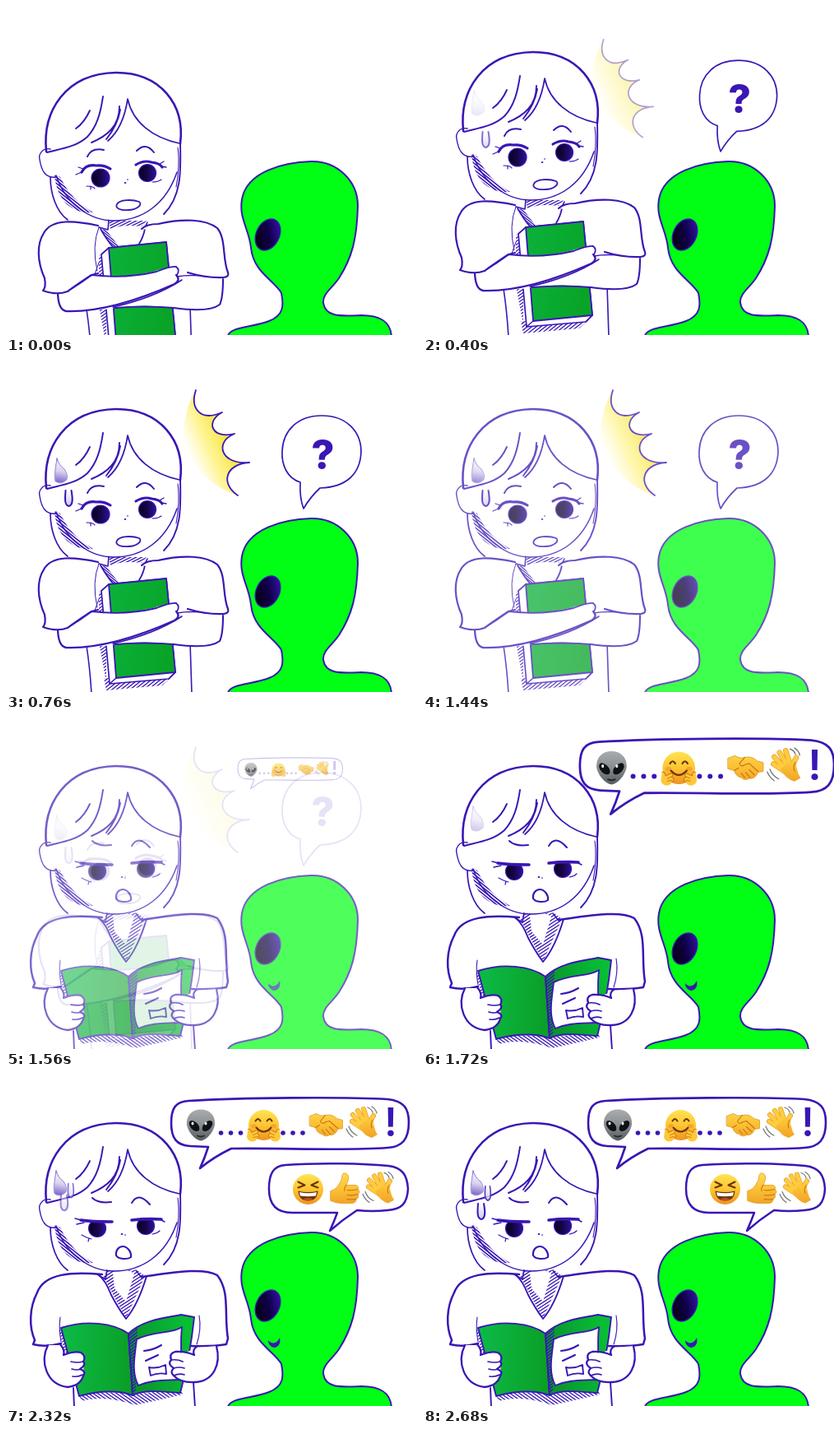
An HTML page with a canvas that plays this animation: 500x400 px, repeating every 3 s.

```html
<!DOCTYPE html>
<html lang="en">
<head>
<meta charset="utf-8">
<title>Alien greeting</title>
<style>
html, body { margin: 0; width: 100%; height: 100%; overflow: hidden; background: #fff; }
canvas { position: absolute; left: 0; top: 0; width: 500px; height: 400px; }
</style>
</head>
<body>
<canvas id="talk" width="500" height="400"></canvas>
<canvas id="meet" width="500" height="400"></canvas>
<script>
const LOOP = 3000, STEP = 40;
const INK = '#3a16b4', GREEN = '#00ff14';
const meet = document.getElementById('meet'), talk = document.getElementById('talk');
let c;

// Eased interpolation through [time, value] pairs
function key(t, ...pts) {
  if (t <= pts[0][0]) return pts[0][1];
  for (let i = 1; i < pts.length; i++) {
    const [a, u] = pts[i - 1], [b, v] = pts[i];
    if (t <= b) {
      const x = (t - a) / (b - a);
      return u + (v - u) * x * x * (3 - 2 * x);
    }
  }
  return pts[pts.length - 1][1];
}

function line(d, w = 2.2, color = INK) {
  c.strokeStyle = color;
  c.lineWidth = w;
  c.stroke(new Path2D(d));
}
function fill(d, color = '#fff') {
  c.fillStyle = color;
  c.fill(new Path2D(d));
}
function shape(d, color, w = 2) {
  fill(d, color);
  line(d, w);
}
function oval(x, y, rx, ry, color, turn = 0) {
  c.beginPath();
  c.ellipse(x, y, rx, ry, turn, 0, 7);
  c.fillStyle = color;
  c.fill();
}
function blend(x0, y0, x1, y1, ...colors) {
  const g = c.createLinearGradient(x0, y0, x1, y1);
  colors.forEach((k, i) => g.addColorStop(i / (colors.length - 1), k));
  return g;
}
function layer(draw) {
  c.save();
  draw();
  c.restore();
}
function at(x, y, draw, alpha = 1) {
  if (alpha <= 0) return;
  layer(() => {
    c.globalAlpha = alpha;
    c.translate(x, y);
    draw();
  });
}
function scaled(x, y, s, draw, alpha = 1) {
  if (s <= 0) return;
  at(x, y, () => {
    c.scale(s, s);
    c.translate(-x, -y);
    draw();
  }, alpha);
}
// Diagonal pen strokes clipped to an area
function hatch(area, x, y, w, h, gap = 3.5, slope = 0.8, weight = 1.3) {
  layer(() => {
    c.clip(new Path2D(area));
    c.beginPath();
    for (let k = y - w; k < y + h + w; k += gap) {
      c.moveTo(x, k);
      c.lineTo(x + w, k + w * slope);
    }
    c.strokeStyle = INK;
    c.lineWidth = weight;
    c.stroke();
  });
}
function glyph(s, x, y, size, weight) {
  c.font = `${weight} ${size}px Inter, sans-serif`;
  c.textAlign = 'center';
  c.textBaseline = 'alphabetic';
  c.fillStyle = INK;
  c.fillText(s, x, y);
}

// ---------- Characters ----------
function alien(smiling) {
  shape('M371 189C402 188 428 212 428 243C427 283 421 306 405 331C396 344 385 350 386 361C389 379 408 377 432 376C456 376 468 384 469 402H270C270 390 300 391 320 383C338 376 338 364 335 349C327 334 301 324 298 294C296 272 283 258 287 235C293 201 338 190 371 189Z', GREEN, 2);
  oval(318.5, 278, 14, 20, blend(304, 279, 335, 272, '#080018', '#10004a', '#3212a0'), 0.45);
  c.strokeStyle = INK;
  c.lineWidth = 1.4;
  c.stroke();
  if (smiling) {
    fill('M319 320C323 325 329 325 333 317C335 325 330 329 326 329C322 328 319 325 319 320Z', INK);
  }
}

function head() {
  fill('M49 152C44 103 72 57 134 56C188 56 218 95 212 142L209 195Q185 236 135 236Q85 232 60 183L42 170Z');
  line('M49 152C44 103 72 57 134 56C188 56 218 95 212 142', 2.6);
  line('M50 153C64 149 85 147 99 134C111 121 115 105 118 85', 1.9);
  line('M102 102C98 111 92 119 85 124M138 97C138 121 123 133 104 141M139 101C137 113 130 127 122 137', 1.9);
  line('M148 88C145 108 138 127 124 139M148 88C154 116 178 135 211 142', 1.7);
  line('M54 149C45 147 39 155 41 162C43 174 47 185 62 183', 1.4);
  line('M54 183C54 203 61 225 75 235', 1.7);
  line('M61 181C72 215 102 236 131 236C167 236 195 215 208 177', 1.5);
  line('M212 142C213 178 213 207 192 228', 1.9);
  line('M209 147C211 160 210 180 207 195', 1.1);
  const shade = 'M59 180L66 183Q79 211 106 226Q88 228 74 216Q61 203 59 180Z';
  hatch(shade, 55, 176, 55, 54, 3.8, 0.8, 1.6);
}

function iris(x, y, r) {
  oval(x, y, r, r, blend(x - r, y, x + r, y, '#08001c', '#160648', '#2c1298'));
  c.strokeStyle = INK;
  c.lineWidth = 1.2;
  c.stroke();
}

function worriedFace() {
  iris(115, 184, 11);
  iris(172, 178, 10.5);
  line('M92 177Q97 167 110 169Q119 168 127 173M158 168Q168 162 177 165Q187 166 190 171', 3.2);
  line('M92 177L85 180M94 173L88 171M189 170L195 171M187 167L192 164', 1.3);
  line('M98 194Q106 194 108 197M178 189Q185 189 189 186M103 194L103 198', 1.2);
  line('M99 158Q104 147 119 150M159 151Q170 140 180 153', 2);
  oval(145, 190, 1.3, 1, INK);
  oval(148, 186, 0.9, 0.8, INK);
  shape('M135 216C138 210 154 210 162 213C167 217 158 223 149 223C140 224 132 221 135 216Z', '#fff', 1.8);
}

function readingFace() {
  iris(111, 184, 10.5);
  iris(170, 181, 10.5);
  fill('M90 165H130V176L90 174ZM154 162H188V173L154 174Z');
  line('M91 174Q104 176 129 176M153 174Q170 172 189 173', 3.6);
  line('M92 174L84 172M95 177L86 179M187 173L193 176', 1.4);
  line('M92 192Q99 196 104 197M101 196L100 200M178 191Q184 190 187 187', 1.2);
  line('M105 147Q112 154 128 152M153 153Q161 139 175 155', 2);
  oval(141, 191, 1.4, 1, INK);
  oval(145, 192, 0.9, 0.8, INK);
  shape('M134 217C133 211 137 206 142 206C148 206 153 213 152 219C148 222 137 222 134 217Z', '#fff', 2.1);
}

function browDrop() {
  const d = 'M-5 -24C-7 -10 -9 -2 -7 4Q0 9 7 2Q9 -4 4 -11Q-3 -16 -5 -24Z';
  fill(d, blend(3, -24, -3, 8, '#ffffff', '#d8d0f0', '#6a52c2'));
  line(d, 1, blend(0, -24, 0, 6, '#7a66c8', '#b8aee2'));
}
function cheekDrop() {
  const d = 'M-4 -9C-5 3 -5 9 0 10C5 9 5 2 3 -9';
  fill(d, blend(0, -9, 0, 10, '#ffffff', '#cfc6ee'));
  line(d, 2);
}

function huggingBody() {
  line('M98 344Q102 370 104 402M224 340Q225 370 226 402', 1.6);
  hatch('M125 236H171L165 243Q142 240 127 246Z', 122, 233, 50, 16, 3.4, -0.5);
  line('M125 235L124 247L113 244M172 238L168 246', 1.6);
  line('M115 246Q123 260 131 269M169 246Q167 256 162 264', 1.8);
  hatch('M115 247L121 246L137 267L131 269Z', 110, 243, 30, 28, 3);

  // Book held against the chest
  hatch('M113 279L122 273V388L113 340Z', 108, 260, 18, 126, 4, -0.7);
  hatch('M119 383L198 385L190 392L122 398Z', 115, 370, 85, 35, 4.4, -0.8);
  shape('M125 269L116 277L126 390L198 384L206 376L195 262Z', '#fff', 1.7);
  shape('M125 269L195 262L206 376L134 383Z', blend(128, 300, 204, 315, '#0bb038', '#08a428'), 1.8);
  line('M126 390L134 383M198 384L206 376', 1.5);

  // Crossed arms and sleeves
  fill('M64 320L104 303Q150 308 196 293Q209 289 210 300L265 304Q266 336 258 341Q225 347 205 342Q165 336 120 344L72 346Q63 340 64 320Z');
  line('M74 322Q90 313 104 302Q145 307 183 298Q200 291 207 292Q212 296 208 302', 1.8);
  line('M63 322Q63 344 73 346Q126 348 205 313Q213 308 207 302', 2.3);
  line('M130 341Q180 330 214 308M208 304Q224 301 248 304', 1.5);
  line('M264 307Q264 330 260 338Q247 348 204 342Q170 339 132 342', 2.1);
  shape('M112 242C84 236 56 233 46 251C37 265 38 286 47 306Q49 317 45 321Q62 327 75 322Q83 316 104 302L112 300', '#fff', 2.2);
  const sleeve = 'M165 246Q171 240 185 240C215 233 243 234 257 245C268 258 263 282 270 299Q272 304 265 305Q244 306 221 299';
  fill(sleeve + 'L212 290L202 262L190 250Z');
  line(sleeve, 2.2);
  line('M113 244Q104 267 111 297M113 287L108 301', 1);
}

function readingBody() {
  hatch('M118 242L126 233L160 235L169 242L146 294Z', 112, 230, 62, 68, 4, -0.65);
  fill('M130 238Q145 231 156 239L146 273L132 257Z');
  line('M123 234L121 246L111 240M158 235L165 244', 1.6);
  line('M113 241Q121 247 128 265Q137 282 146 294Q161 276 171 242', 1.9);
  line('M117 240C81 237 47 238 38 262C28 281 28 304 35 320L33 325Q48 329 67 324', 2.5);
  line('M165 243C202 238 240 231 257 241C273 261 265 289 270 318L268 325Q250 328 225 327', 2.5);
  line('M66 292Q64 305 67 322M235 290Q238 307 232 325', 1.1);
  line('M82 378L83 402M228 371L230 402', 1.9);

  // Open book
  hatch('M64 306L72 311L90 388L73 340Z', 60, 296, 32, 94, 4, -0.7);
  hatch('M89 387Q125 380 154 386L213 379L215 386L157 399Q120 386 92 394Z', 85, 372, 130, 30, 4, 0.7);
  shape('M67 305C97 295 131 299 149 312L154 387C132 379 108 383 89 388Z', blend(70, 345, 154, 350, '#0cb945', '#0a9e26'), 1.9);
  shape('M149 312C167 294 200 292 213 289L229 292Q224 340 212 384C190 383 170 379 154 387Z', blend(150, 345, 226, 330, '#089428', '#08a832', '#08be34'), 1.9);
  hatch('M149 313L160 305L158 383L154 387Z', 145, 298, 18, 92, 3.8, -0.8);
  shape('M159 319C180 308 201 313 214 304C211 328 216 345 210 368C190 369 178 368 161 375C152 358 157 338 159 319Z', '#fff', 1.8);
  line('M168 333Q179 332 189 326M170 345L185 338', 2.1);
  line('M174 353Q184 355 194 350L195 361Q185 359 176 363Z', 1.9);

  // Forearms and fingers
  fill('M51 326H68L74 337Q94 330 95 340L94 363Q86 378 72 377Q43 366 51 326Z');
  line('M51 326C41 346 49 374 75 377Q91 375 94 363Q98 358 90 355Q98 350 94 346Q98 339 91 335Q83 333 70 338Q72 332 66 325', 2.3);
  line('M79 346Q87 348 94 346M80 355Q87 357 91 355M81 364Q88 365 93 362', 1.7);
  fill('M257 327L231 329Q224 335 205 336L200 343L203 363Q212 370 228 371Q257 372 257 327Z');
  line('M256 327C262 350 252 370 230 371Q212 372 204 363Q199 359 204 354Q196 349 201 344Q198 336 206 334Q218 333 229 338Q226 331 233 327', 2.3);
  line('M201 344Q209 343 215 346M204 354Q211 352 217 354M204 363Q211 360 217 362', 1.7);
}

// ---------- Emoji, drawn in a 40 px box ----------
const skin = () => blend(0, -19, 0, 19, '#ffdb52', '#fcc236', '#f0a226');
const CREASE = '#c87512', BROWN = '#6b3308';

function face() {
  oval(0, 0, 18.5, 18.5, blend(0, -18, 0, 18, '#ffe34f', '#fdc534', '#ef9420'));
}
function alienHead() {
  fill('M0 -19C13 -19 18 -9 17 0C15 9 7 18 0 19C-7 18 -15 9 -17 0C-18 -9 -13 -19 0 -19Z', blend(0, -19, 0, 19, '#a9adb0', '#888d91', '#555b60'));
  oval(-8, 1, 4.6, 7.8, '#101114', -0.75);
  oval(8, 1, 4.6, 7.8, '#101114', 0.75);
  oval(-10, -2, 1.5, 2, '#e9edf0');
  oval(6, -2, 1.5, 2, '#e9edf0');
  line('M-4 13Q0 15 4 13', 1.8, '#24272a');
}
function hug() {
  face();
  line('M-10 -5Q-7 -10 -4 -5M4 -5Q7 -10 10 -5', 2, BROWN);
  line('M-9 3Q0 13 9 3', 2.2, BROWN);
  oval(-12, 1, 3.5, 2.5, '#f08a3088');
  oval(12, 1, 3.5, 2.5, '#f08a3088');
  for (const s of [-1, 1]) layer(() => {
    c.scale(s, 1);
    fill('M-19 5Q-16 3 -15 9L-9 6Q-5 7 -8 10L-6 12Q-5 15 -8 16Q-9 20 -15 20Q-22 18 -20 11Z', '#ffc83a');
    line('M-19 5Q-16 3 -15 9L-9 6Q-5 7 -8 10L-6 12Q-5 15 -8 16', 1, CREASE);
    line('M-13 12L-8 10M-13 15L-8 14', 0.9, CREASE);
  });
}
function laugh() {
  face();
  line('M-12 -9L-4 -5L-12 -2M12 -9L4 -5L12 -2', 2.1, BROWN);
  fill('M-12 2Q0 5 12 2Q11 14 0 14Q-11 14 -12 2Z', BROWN);
  fill('M-10.5 3.5Q0 6 10.5 3.5L9.5 8Q0 9.5 -9.5 8Z');
  oval(0, 12, 5.5, 1.6, '#b8502c');
}
function shake() {
  const d = 'M-20 -9L-12 -12Q-7 -8 -1 -10Q7 -12 13 -6L20 -4L20 6L14 7Q11 15 4 14Q-1 17 -5 13Q-11 12 -13 5L-20 3Z';
  fill(d, skin());
  line(d, 0.8, '#e09a28');
  line('M-1 -10L-7 -3Q-6 2 0 -2L4 -3L14 6M4 4L10 10M0 7L5 13M-5 8L-1 13M-13 5L-8 2', 1.1, CREASE);
}
function thumb() {
  const d = 'M-17 3Q-10 1 -7 -5Q-3 -10 -3 -16Q-2 -20 2 -18Q6 -16 4 -9L2 -4H13Q18 -3 16 1Q20 4 16 7Q18 11 14 13Q14 18 8 18H-4Q-10 18 -17 15Z';
  fill(d, skin());
  line(d, 0.8, '#e09a28');
  line('M3 2Q9 3 16 1M3 8Q10 9 16 7M3 13Q9 14 14 13M2 -4Q-1 -1 0 3', 1.1, CREASE);
}
function wave() {
  const fingers = 'M7 2L1 -16M4 3L-6 -14M2 6L-12 -9M2 9L-13 -1M10 4Q9 -3 13 -8';
  line(fingers, 6, '#df9a22');
  line(fingers, 4.8, '#ffcb40');
  fill('M-5 5L5 -4Q13 -3 14 5Q15 11 18 15L11 19Q2 17 -5 5Z', skin());
  line('M12 -3Q9 2 11 7', 1.1, CREASE);
  line('M6 -18Q11 -16 12 -12M11 -19Q16 -16 17 -11M-17 5Q-14 13 -7 16M-20 8Q-17 15 -12 18', 1.3, '#77797c');
}

// ---------- Bubbles and effects ----------
function questionBubble() {
  shape('M358 145C342 140 335 124 336 107C337 82 355 64 384 64C414 64 432 83 432 108C431 135 414 151 382 152Q370 163 362 177Q357 164 358 145Z', '#fff', 1.7);
  glyph('?', 385.5, 129, 49, 800);
}
function dots(x) {
  for (const dx of [0, 12, 24]) oval(x + dx, 68, 2.8, 2.8, INK);
}
function longBubble() {
  shape('M222 29C285 25 410 24 464 27C484 29 490 38 490 55C490 76 482 85 464 86C410 90 337 86 274 87Q253 97 236 111Q242 98 246 85L224 84C207 83 201 74 201 56C201 38 206 30 222 29Z', '#fff', 2.6);
  at(237, 58.5, alienHead);
  dots(261.5);
  at(313.5, 58.5, hug);
  dots(337);
  at(389.5, 56.5, shake);
  at(434, 55, wave);
  glyph('!', 468, 72, 48, 600);
}
function shortBubble() {
  shape('M340 107C380 104 435 105 465 108C482 110 488 119 489 136C488 154 481 161 464 162Q446 164 427 162Q410 173 394 187Q399 176 403 165L348 165C328 165 320 154 320 136C320 118 325 108 340 107Z', '#fff', 2.5);
  at(367.5, 136.5, laugh);
  at(412, 135.5, thumb);
  at(454, 134.5, wave);
}
function burst() {
  const edge = 'M231 33C224 54 235 72 263 60C242 71 250 93 278 86C253 96 261 124 296 121C266 123 261 147 282 161';
  fill(edge + 'Q235 146 215 95Q216 57 231 33Z', blend(220, 108, 266, 88, '#fff58a00', '#fff06cb0', '#f5e542'));
  line(edge, 1.8);
}

function drawMeet(t) {
  alien(false);
  layer(() => {
    c.translate(0, key(t, [160, 25], [360, 0]));
    huggingBody();
    head();
    worriedFace();
    at(67, key(t, [320, 122], [400, 127], [640, 140]), browDrop, key(t, [360, 0], [400, 0.15], [600, 1]));
    at(76.5, key(t, [280, 158], [400, 162], [600, 164]), cheekDrop, key(t, [280, 0], [400, 0.6], [560, 1]));
  });
  scaled(70, 140, key(t, [280, 0.82], [400, 0.93], [600, 1.04], [720, 1.02], [760, 1]), burst,
    key(t, [280, 0], [400, 0.4], [600, 1]));
  scaled(364, 172, key(t, [200, 0], [400, 0.98], [500, 1.04], [680, 1]), questionBubble,
    key(t, [200, 0], [320, 1]));
}

function drawTalk(t) {
  alien(true);
  readingBody();
  head();
  readingFace();
  at(66, key(t, [1640, 120], [1720, 129], [1960, 138]), browDrop, key(t, [1640, 0], [1720, 0.35], [1960, 1]));
  at(79, key(t, [2000, 131], [2520, 141]), () => {
    c.scale(0.8, 0.9);
    cheekDrop();
  }, key(t, [2000, 0], [2080, 0.3], [2520, 0.85]));
  at(71, key(t, [2120, 148], [2680, 163]), cheekDrop, key(t, [2120, 0], [2520, 1]));
  scaled(346, 62, key(t, [1500, 0.3], [1720, 1.07], [1960, 1]), longBubble, key(t, [1500, 0], [1640, 1]));
  scaled(408, 148, key(t, [1960, 0], [2080, 0.96], [2200, 1.06], [2360, 0.99], [2520, 1]), shortBubble,
    key(t, [1960, 0], [2060, 1]));
}

function render(canvas, opacity, draw, t) {
  canvas.style.opacity = opacity;
  if (opacity <= 0) return;
  c = canvas.getContext('2d');
  c.clearRect(0, 0, 500, 400);
  c.lineCap = c.lineJoin = 'round';
  draw(t);
}

const start = performance.now();
function tick() {
  const now = (performance.now() - start) % LOOP;
  const t = Math.floor(now / STEP) * STEP;
  render(meet, key(t, [1400, 1], [1440, 0.75], [1600, 0]), drawMeet, t);
  render(talk, key(t, [1440, 0], [1640, 1]), drawTalk, t);
  requestAnimationFrame(tick);
}
tick();
</script>
</body>
</html>
```
